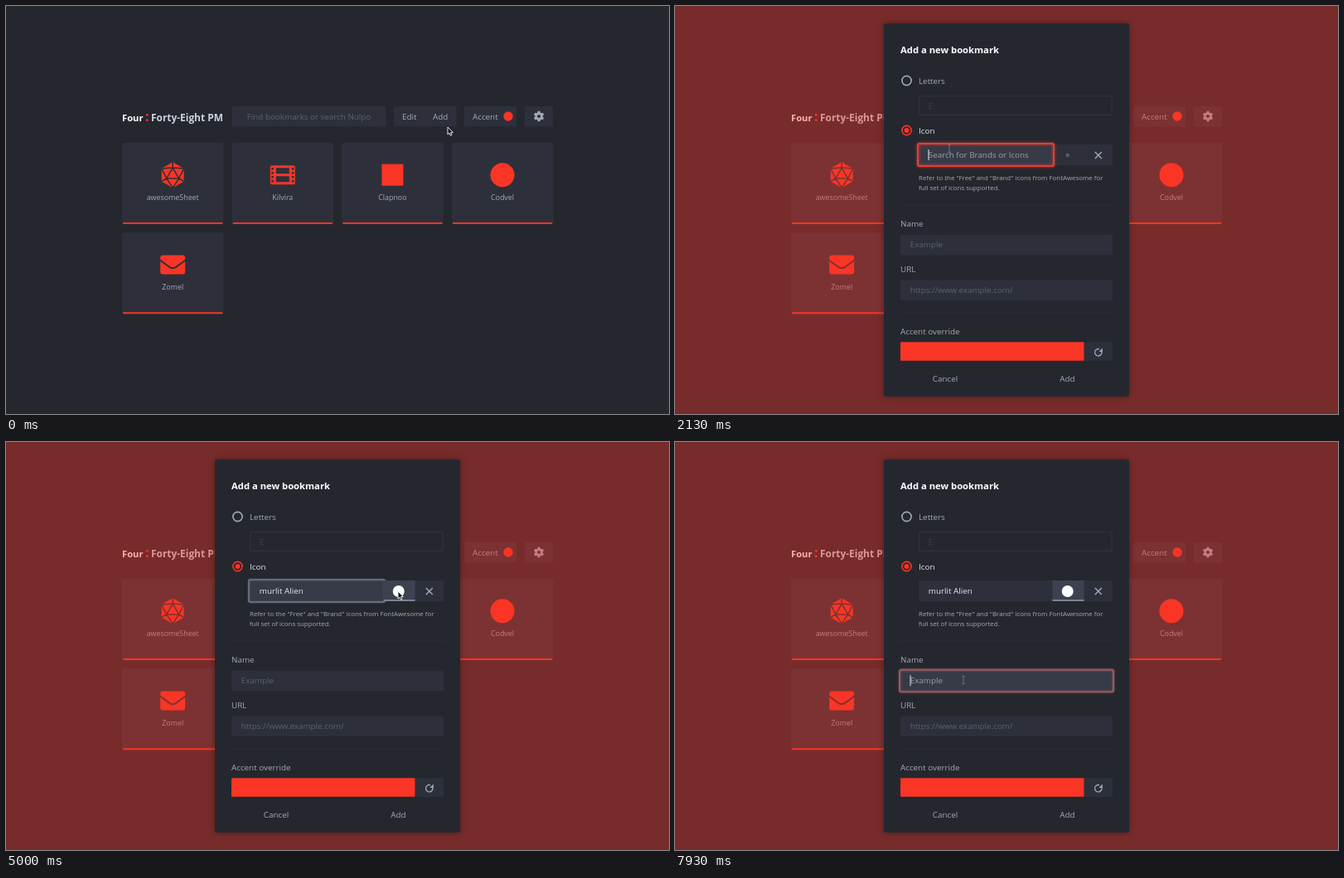
Recreate the animation shown at these times as an HTML page with a canvas. Size 800 by 492 pixels, loop 8 s.

```html
<!DOCTYPE html>
<html lang="en">
<head>
<meta charset="utf-8">
<title>Start page</title>
<style>
html, body { margin: 0; width: 100%; height: 100%; overflow: hidden; background: #26282f; }
canvas { display: block; }
</style>
</head>
<body>
<canvas id="stage" width="800" height="492"></canvas>
<script>
const ctx = document.getElementById('stage').getContext('2d');
const LOOP = 8000;
const BG = '#25272f', PANEL = '#2d303a', RED = '#fa3526', TEXT = '#a4a9b8', PALE = '#e4e7f0', DIM = '#5c6170';
const SANS = '"Open Sans", "Noto Sans", sans-serif';
const TITLE = '"Open Sans", "Noto Sans", Roboto, sans-serif';
const BRAND = 'murlit';

const clamp = v => Math.max(0, Math.min(1, v));
const smooth = v => v * v * (3 - 2 * v);
const ramp = (t, from, to) => smooth(clamp((t - from) / (to - from)));
const mix = (a, b, k) => `rgb(${a.map((v, i) => Math.round(v + (b[i] - v) * k))})`;

function box(x, y, w, h, color, r = 0) {
  ctx.fillStyle = color;
  ctx.beginPath();
  ctx.roundRect(x, y, w, h, r);
  ctx.fill();
}
function frame(x, y, w, h, color, width = 1, r = 1) {
  ctx.strokeStyle = color;
  ctx.lineWidth = width;
  ctx.beginPath();
  ctx.roundRect(x, y, w, h, r);
  ctx.stroke();
}
function disc(x, y, r, color) {
  ctx.fillStyle = color;
  ctx.beginPath();
  ctx.arc(x, y, r, 0, 7);
  ctx.fill();
}
function lines(color, width, ...paths) {
  ctx.strokeStyle = color;
  ctx.lineWidth = width;
  ctx.lineJoin = 'round';
  ctx.beginPath();
  for (const p of paths) p.forEach(([x, y], i) => i ? ctx.lineTo(x, y) : ctx.moveTo(x, y));
  ctx.stroke();
}
function shape(color, points) {
  ctx.fillStyle = color;
  ctx.beginPath();
  points.forEach(([x, y]) => ctx.lineTo(x, y));
  ctx.closePath();
  ctx.fill();
}
function text(s, x, y, color = TEXT, size = 9.85, align = 'left', family = SANS) {
  ctx.font = `${size}px ${family}`;
  ctx.textAlign = align;
  ctx.fillStyle = color;
  ctx.fillText(s, x, y);
}
// Condensed heading, as large as its room allows
function heading(s, x, y, room, color) {
  ctx.save();
  ctx.fontStretch = 'extra-condensed';
  ctx.font = `700 16px ${TITLE}`;
  const size = Math.min(16, 16 * room / ctx.measureText(s).width);
  ctx.font = `700 ${size}px ${TITLE}`;
  ctx.textAlign = 'left';
  ctx.fillStyle = color;
  ctx.fillText(s, x, y);
  ctx.restore();
}

function dieIcon(x, y) {
  const ring = (r, turn) => [0, 1, 2, 3, 4, 5].map(i => {
    const a = (i * 60 + turn) * Math.PI / 180;
    return [x + r * Math.sin(a), y - r * Math.cos(a)];
  });
  const o = ring(15.5, 0), n = ring(8.6, 0);
  const tri = [n[0], n[2], n[4]];
  shape(RED, o);
  lines(PANEL, 1.5, [...tri, n[0]], [o[0], n[0]], [o[2], n[2]], [o[4], n[4]],
    [o[1], n[0], o[5]], [o[1], n[2], o[3]], [o[5], n[4], o[3]]);
}
function filmIcon(x, y) {
  box(x - 15, y - 11.5, 30, 23, RED, 2);
  for (const side of [-12.3, 12.3])
    for (let i = 0; i < 4; i++) box(x + side - 1.3, y - 8.8 + i * 5, 2.6, 2.6, PANEL, .5);
  box(x - 8, y - 8.5, 16, 7, PANEL, .5);
  box(x - 8, y + 1.5, 16, 7, PANEL, .5);
}
function mailIcon(x, y) {
  box(x - 15, y - 11.5, 30, 23, RED, 3);
  ctx.strokeStyle = PANEL;
  ctx.lineWidth = 2;
  ctx.beginPath();
  ctx.moveTo(x - 16, y - 6);
  ctx.lineTo(x - 4, y + 2.8);
  ctx.quadraticCurveTo(x, y + 5.2, x + 4, y + 2.8);
  ctx.lineTo(x + 16, y - 6);
  ctx.stroke();
}
function gearIcon(x, y) {
  for (let i = 0; i < 6; i++) {
    ctx.save();
    ctx.translate(x, y);
    ctx.rotate(i * Math.PI / 3);
    box(-1.6, -6.2, 3.2, 4, TEXT, .6);
    ctx.restore();
  }
  disc(x, y, 4.7, TEXT);
  disc(x, y, 2, PANEL);
}

const cards = [
  ['awesomeSheet', dieIcon],
  ['Kilvira', filmIcon],
  ['Clapnoo', (x, y) => box(x - 13, y - 13, 26, 26, RED)],
  ['Codvel', (x, y) => disc(x, y, 14.5, RED)],
  ['Zomel', mailIcon]
];

function page(t) {
  box(0, 0, 800, 492, BG);
  heading('Four', 140, 138.5, 25.5, '#fff');
  heading(':', 168, 138.5, 5, RED);
  heading('Forty-Eight PM', 175, 138.5, 87, '#cdd1de');

  box(273, 121, 185.5, 24.5, PANEL, 1);
  text('Find bookmarks or search Nulpo', 365.5, 136.5, DIM, 9.85, 'center');

  box(468, 121, 75.5, 24.5, PANEL, 1);
  const hover = ramp(t, 110, 230);
  if (hover) {
    ctx.globalAlpha = hover;
    box(505, 121, 38.5, 24.5, '#434857', 1);
    box(505, 143.5, 38.5, 2, RED, 1);
    ctx.globalAlpha = 1;
  }
  text('Edit', 486.7, 136.5, TEXT, 9.85, 'center');
  text('Add', 524.2, 136.5, mix([164, 169, 184], [235, 238, 246], hover), 9.85, 'center');
  box(553, 121, 63, 24.5, PANEL, 1);
  text('Accent', 563, 136.5);
  disc(606, 133, 5.7, RED);
  box(626, 121, 34, 24.5, PANEL, 1);
  gearIcon(643, 133);

  cards.forEach(([name, icon], i) => {
    const x = 140 + (i % 4) * 132.6, y = i < 4 ? 165 : 273.3;
    box(x, y, 122.5, 98, PANEL, 2);
    box(x + 1, y + 96, 120.5, 2, RED, 1);
    icon(x + 61.2, y + 38.7);
    text(name, x + 61.2, y + 68.8, TEXT, 8.9, 'center');
  });
}

function radio(y, label, on) {
  ctx.strokeStyle = on ? RED : TEXT;
  ctx.lineWidth = 1.6;
  ctx.beginPath();
  ctx.arc(279.5, y, 5.6, 0, 7);
  ctx.stroke();
  if (on) disc(279.5, y, 3, RED);
  text(label, 294, y + 3.7, on ? PALE : TEXT);
}
function focusRing(x, y, w, h, age) {
  const k = clamp(age / 250), color = mix([250, 53, 38], [102, 107, 123], k);
  box(x, y, w, h, '#373b48', 1);
  ctx.save();
  ctx.shadowColor = color;
  ctx.shadowBlur = 4 * (1 - k * .6);
  frame(x - 1, y - 1, w + 2, h + 2, color, 2, 2);
  ctx.restore();
}
function caret(x, y, age) {
  if (age >= 0 && age % 1000 < 500) box(x, y, 1, 13, PALE);
}
function field(y, hint, focus) {
  if (focus >= 0) focusRing(272, y, 256, 24.5, focus);
  else box(272, y, 256, 24.5, PANEL, 1);
  text(hint, 283.7, y + 15.7, focus >= 0 ? '#9a9fae' : DIM);
  caret(283.5, y + 5.5, focus);
}

const CLICK_ICON = 1560, FOCUS = 2090, TYPE = 2520, PICK = 4540, NAME = 7760;

function iconRow(t) {
  const enabled = t >= CLICK_ICON, picked = t >= PICK;
  const typed = BRAND.slice(0, Math.max(0, Math.floor((t - TYPE) / 115) + 1));
  const value = picked ? BRAND + ' Alien' : typed;
  const focused = t >= FOCUS && t < 5250;

  if (!enabled) {
    frame(294.5, 167.5, 161, 24, PANEL);
    box(494, 167, 34, 25, PANEL, 1);
    ctx.globalAlpha = .5;
  } else {
    box(294, 167, 234, 25, PANEL, 1);
    if (focused) focusRing(294, 167, 162, 25, t - FOCUS);
  }
  if (value) text(value, 305.8, 183.4, PALE);
  else text('Search for Brands or Icons', 305.8, 183.4, focused ? '#9a9fae' : DIM);
  if (focused && t < TYPE) caret(305.5, 173, t - FOCUS);
  else if (t >= TYPE && t < 3300) box(307.5 + ctx.measureText(value).width, 173, 1, 13, PALE);

  const grow = ramp(t, 5340, 5600) - ramp(t, 7070, 7330);
  if (picked) {
    ctx.globalAlpha = 1 - grow;
    box(455.5, 167, 38, 25, '#3d4250');
    box(455.5, 190, 38, 2, '#7d8292');
    ctx.globalAlpha = 1;
  } else {
    disc(473.7, 180, 2.4, '#555a69');
  }
  lines(TEXT, 1.4, [[506.8, 176], [514.8, 184]], [[514.8, 176], [506.8, 184]]);
  ctx.globalAlpha = enabled ? 1 : .5;
  text('Refer to the "Free" and "Brand" icons from FontAwesome for', 294, 210.3, TEXT, 7.9);
  text('full set of icons supported.', 294, 221.7, TEXT, 7.9);
  ctx.globalAlpha = 1;
  return { picked, grow };
}

function choices(t) {
  ctx.save();
  ctx.shadowColor = 'rgba(0,0,0,.35)';
  ctx.shadowBlur = 8;
  ctx.shadowOffsetY = 3;
  box(294, 197, 234, 65, PANEL, 1);
  ctx.restore();
  const logo = ramp(t, 3600, 3700) * (1 - ramp(t, 3880, 4120));
  const alien = ramp(t, 3890, 3990);
  ctx.globalAlpha = logo;
  frame(303.5, 206.5, 71, 46, RED, 1.5, 2);
  ctx.globalAlpha = alien;
  box(375, 206, 73, 47, '#262830', 2);
  frame(375, 206, 72.5, 47, RED, 1.8, 2);
  ctx.globalAlpha = 1;
  const ink = '#d9dce6';
  disc(339.6, 223.3, 9.7, ink);
  disc(411, 223.3, 9, alien > .5 ? '#fff' : ink);
  box(473.8, 214.6, 17.5, 17.5, ink, 1);
  ['Logo', 'Alien', 'Square'].forEach((s, i) =>
    text(`${BRAND} ${s}`, 339.6 + i * 71.5, 242.6, '#7b8090', 5.9, 'center'));
}

function reloadIcon(x, y) {
  ctx.strokeStyle = TEXT;
  ctx.lineWidth = 1.4;
  ctx.beginPath();
  ctx.arc(x, y, 4.2, -.6, 5, false);
  ctx.stroke();
  shape(TEXT, [[x + 5, y - 5.2], [x + 5, y - .8], [x + .6, y - .8]]);
}

function dialog(t) {
  const show = ramp(t, 430, 720);
  if (!show) return;
  ctx.save();
  ctx.globalAlpha = show;
  ctx.translate(0, 24 * (1 - show));
  ctx.shadowColor = 'rgba(0,0,0,.35)';
  ctx.shadowBlur = 8;
  box(252, 21, 296, 450, BG, 2);
  ctx.shadowColor = 'transparent';
  if (show === 1) dialogBody(t);
  else {
    // Contents fade with the panel as one layer
    ctx.beginPath();
    ctx.rect(252, 21, 296, 450);
    ctx.clip();
    dialogBody(t);
    ctx.globalAlpha = 1 - show;
    box(252, 21, 296, 450, BG, 2);
  }
  ctx.restore();
}

function dialogBody(t) {
  const iconMode = t >= CLICK_ICON;
  heading('Add a new bookmark', 272, 57, 119, '#fff');
  radio(90, 'Letters', !iconMode);
  if (iconMode) frame(294.8, 108.8, 232.4, 22.6, PANEL, 1.6);
  else box(294, 108, 234, 24.5, PANEL, 1);
  text('E', 305.8, 123.7, iconMode ? '#3c404c' : DIM);
  radio(150, 'Icon', iconMode);
  const { picked, grow } = iconRow(t);

  box(272, 239.5, 256, 1, PANEL);
  text('Name', 272, 266.3);
  field(275.7, 'Example', t - NAME);
  text('URL', 272, 321.2);
  field(330.5, 'https://www.example.com/', -1);
  box(272, 369.5, 256, 1, PANEL);
  text('Accent override', 272, 396);
  box(272, 405.3, 221.5, 22.5, RED, 1);
  box(494, 405.3, 34, 22.5, PANEL, 1);
  reloadIcon(510.8, 417.7);
  text('Cancel', 326, 453.3, TEXT, 9.85, 'center');
  text('Add', 473.5, 453.3, TEXT, 9.85, 'center');

  if (t >= TYPE + 230 && t < PICK) choices(t);
  if (picked) disc(473.7, 180, 7 + 20 * grow, '#fff');
}

function status(t) {
  const a = ramp(t, 3680, 3780) - ramp(t, 4640, 4760);
  if (!a) return;
  ctx.globalAlpha = a;
  box(0, 479, 243, 13, '#f4f4f4', [0, 2, 0, 0]);
  text('chrome-extension://aemahhpejhaanjmpgicaplodlgefjnha/index.html#', 2, 488.6, '#4c4c4c', 7.7, 'left', 'Roboto, sans-serif');
  ctx.globalAlpha = 1;
}

const route = [
  [0, 533, 146], [70, 533, 146], [250, 530, 135.5], [760, 530, 135.5], [1420, 281, 148], [1640, 281, 148],
  [2050, 331, 172], [3330, 331, 172], [3650, 345, 225], [3850, 345, 225], [3980, 411, 224], [4600, 411, 224],
  [4940, 473, 180], [5300, 473, 180], [5700, 472, 190], [7030, 472, 190], [7650, 348, 287], [LOOP, 348, 287]
];
function pointer(t) {
  if (t > 2480 && t < 3330) return;
  const i = route.findIndex(p => p[0] > t);
  const [a, x0, y0] = route[i - 1], [b, x1, y1] = route[i];
  const k = ramp(t, a, b), x = x0 + (x1 - x0) * k, y = y0 + (y1 - y0) * k;
  const beam = (t > 1950 && t < 3500) || t > 7560;
  if (beam) {
    lines('#7c808d', .8, [[x - 2, y - 5], [x, y - 4], [x, y + 4], [x - 2, y + 5]],
      [[x + 2, y - 5], [x, y - 4]], [[x, y + 4], [x + 2, y + 5]]);
    return;
  }
  const tip = [[0, 0], [0, 9], [2, 7.2], [3.4, 10.3], [4.9, 9.6], [3.6, 6.6], [6.3, 6.5]].map(([u, v]) => [x + u, y + v]);
  shape('#0c0c10', tip);
  lines('#fff', .9, [...tip, tip[0]]);
}

function draw(now) {
  const t = now % LOOP;
  page(t);
  ctx.globalAlpha = .385 * ramp(t, 230, 390);
  box(0, 0, 800, 492, RED);
  ctx.globalAlpha = 1;
  dialog(t);
  status(t);
  pointer(t);
  requestAnimationFrame(draw);
}
requestAnimationFrame(draw);
</script>
</body>
</html>
```
